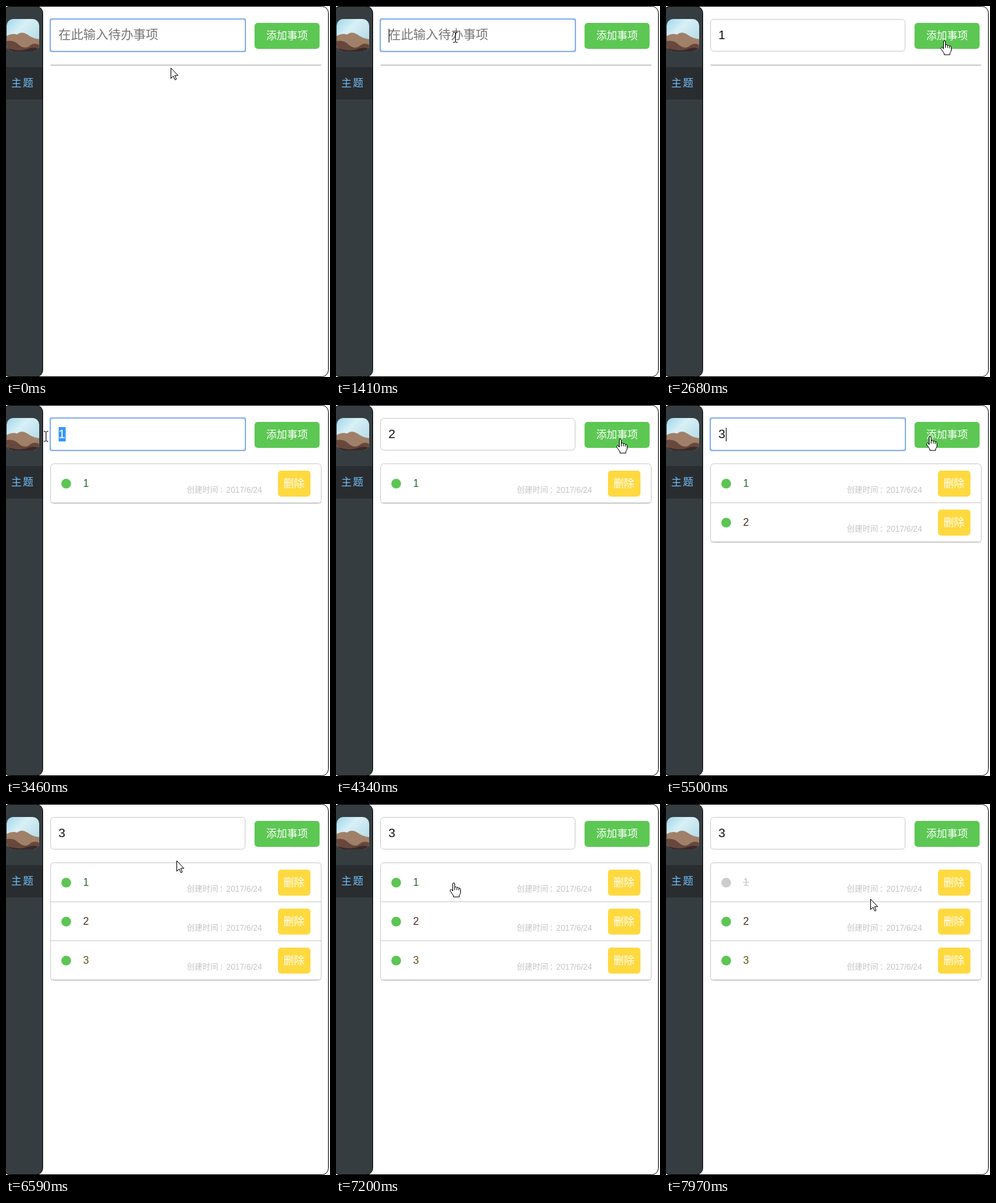
An HTML page for the animation above (8 s loop, 498 by 571 pixels).

```html
<!DOCTYPE html>
<html lang="zh-CN">
<head>
<meta charset="utf-8">
<title>待办事项</title>
<style>
  html, body { margin: 0; width: 100%; height: 100%; overflow: hidden; background: #fff; }
  svg { display: block; width: 498px; height: 571px; }
  text { font-family: "Liberation Sans", "Noto Sans CJK SC", "Noto Sans CJK", sans-serif; font-size: 16px; }
  .cjk { font-family: "Noto Sans CJK SC", "Noto Sans CJK", sans-serif; }
  .field { font-size: 19.2px; }
  .date { font-size: 12px; fill: #c4c4c4; }
  .mid { text-anchor: middle; fill: #fff; }
</style>
</head>
<body>
<svg viewBox="0 0 498 571">
  <defs>
    <linearGradient id="sky" x1="0" y1="0" x2="1" y2="1">
      <stop offset="0" stop-color="#9fd6ea"/>
      <stop offset=".35" stop-color="#d8f0f6"/>
      <stop offset="1" stop-color="#a9d3e2"/>
    </linearGradient>
    <clipPath id="round"><rect x="1" y="20" width="50" height="50" rx="10"/></clipPath>
  </defs>

  <rect x="-3.5" y=".5" width="499" height="570" rx="10" fill="#fff" stroke="#000"/>
  <rect x="-3.5" y=".5" width="60" height="570" rx="10" fill="#363d40" stroke="#000"/>
  <rect y="94" width="56" height="50" fill="#2a2d30"/>
  <text class="cjk" x="8" y="124" fill="#70bdf5" letter-spacing="2">主题</text>

  <g clip-path="url(#round)">
    <rect x="1" y="20" width="50" height="50" fill="url(#sky)"/>
    <path d="M1 46Q10 41 17 44Q24 38 33 44Q41 50 51 51V70H1Z" fill="#a08068"/>
    <path d="M1 54Q12 52 20 60Q30 68 38 60Q45 56 51 60V70H1Z" fill="#68483c"/>
    <path d="M1 65Q20 70 30 67Q42 62 51 66V70H1Z" fill="#3a2a2c"/>
  </g>

  <rect id="box" x="68.5" y="20.5" width="299" height="49" rx="5" fill="#fff" stroke="#ccc"/>
  <rect id="ring" x="68" y="20" width="300" height="50" rx="2" fill="none" stroke="#8ab2ec" stroke-width="2"/>
  <rect id="mark" x="81" y="34" width="10.7" height="22" fill="#3297fd"/>
  <text id="hint" class="cjk field" x="80.5" y="51" fill="#757575">在此输入待办事项</text>
  <text id="value" class="field" x="80.5" y="51"></text>
  <rect id="caret" y="35" width="1" height="21"/>

  <rect x="382" y="26" width="100" height="40" rx="5" fill="#5cc853"/>
  <text class="cjk mid" x="432" y="51">添加事项</text>

  <rect id="list" x="68.5" y="90.5" width="416" fill="#fff" stroke="#ccc"/>
  <g id="rows"></g>

  <g id="pointer" stroke="#000" stroke-width="1" fill="#fff">
    <path id="arrow" d="M.5 .5V16.5L4.2 13L6.8 18.7L9 17.7L6.5 12H11.5Z"/>
    <path id="hand" d="M-1.5 12V1Q-1.5 -.5 0 -.5Q1.5 -.5 1.5 1V6Q4 4.7 4.8 6.6Q7 5.5 7.8 7.6Q10.5 7 10.5 9.5V14Q10 17 8.5 18.5V21H-.5V19L-5 12.5Q-6.5 9.8 -4.5 9.3Q-3 9.2 -1.5 12ZM1.5 6V10.5M4.8 6.6V10.5M7.8 7.6V11"/>
    <path id="beam" fill="none" d="M-3 -7.5H-1L.5 -6.5L2 -7.5H4M.5 -6.5V7M-3 8H-1L.5 7L2 8H4"/>
  </g>
</svg>
<script>
const LOOP = 8000, STEP = 78.7, BLINK = 530;
const $ = id => document.getElementById(id);
const show = (el, on) => el.setAttribute("visibility", on ? "visible" : "hidden");
const set = (el, attrs) => { for (const k in attrs) el.setAttribute(k, attrs[k]); };

// time, x, y, easing of the way there
const ease = {
  line: p => p,
  out: p => 1 - (1 - p) ** 2,
  in: p => p * p,
  both: p => p * p * (3 - 2 * p)
};
const path = [
  [0, 253, 95, "line"], [472, 183, 48, "out"],
  [1730, 183, 48, "line"], [2520, 428, 54, "both"],
  [2830, 428, 54, "line"], [3300, 108, 47, "both"],
  [3540, 39, 48, "line"], [3700, 85, 49, "line"],
  [4250, 437, 53, "both"], [4420, 437, 53, "line"],
  [4580, 350, 54, "in"], [4740, 112, 57, "line"],
  [4960, 45, 68, "out"], [5420, 369, 50, "in"],
  [5505, 404, 49, "line"], [5740, 454, 50, "out"],
  [6280, 454, 50, "line"], [6600, 237, 92, "both"],
  [7130, 182, 122, "out"], [7200, 179, 122, "line"],
  [7440, 179, 122, "line"], [7960, 314, 146, "both"]
];

// latest entry whose time has come
const latest = (list, t) => list.filter(e => t >= e[0]).pop();

const typed = [[0, ""], [1800, "1"], [3780, "2"], [5340, "3"]];
const focus = [[0, true], [2670, false], [3300, true], [4330, false], [4740, true], [5960, false]];
const blinks = [340, 1800, 3300, 3780, 4740, 5340].map(t => [t]);
const drags = [[3300, 3780], [4740, 5340]];
const added = [2745, 4410, 6110], done = 7420;

const tints = ["#2f6b35", "#4a3022", "#62510f"];
$("rows").innerHTML = tints.map((tint, i) => `
  <g transform="translate(0 ${60 * i})">
    <path d="M69 150.5H484" stroke="#ccc"/>
    <circle cx="92.5" cy="121" r="7.5" fill="#5cc553"/>
    <text x="118.5" y="126" fill="${tint}">${i + 1}</text>
    <path d="M118 120.5H128" stroke="#c8c8c8" visibility="hidden"/>
    <text class="date cjk" x="278" y="135">创建时间<tspan dx="2">：</tspan></text>
    <text class="date" x="338.5" y="135" style="font-size:12.4px">2017/6/24</text>
    <rect x="418" y="101" width="50" height="40" rx="5" fill="#ffd940"/>
    <text class="cjk mid" x="442.5" y="126">删除</text>
  </g>`).join("");
const rows = [...$("rows").children];
const [, dot, label, strike] = rows[0].children;

function pointerAt(t) {
  const i = path.findIndex(p => p[0] > t);
  if (i < 0) return path[path.length - 1].slice(1, 3);
  const [t0, x0, y0] = path[i - 1], [t1, x1, y1, kind] = path[i];
  const p = ease[kind]((t - t0) / (t1 - t0));
  return [x0 + (x1 - x0) * p, y0 + (y1 - y0) * p].map(Math.round);
}

function shapeAt(x, y, dragging) {
  const inside = (l, t, r, b) => x >= l && x < r && y >= t && y < b;
  if (dragging || inside(68, 20, 370, 70)) return "beam";
  if (inside(382, 26, 482, 66) || inside(110, 101, 270, 141)) return "hand";
  return "arrow";
}

function draw(t) {
  const text = latest(typed, t)[1];
  const active = latest(focus, t)[1];
  const dragging = drags.some(([a, b]) => t >= a && t < b);
  const [x, y] = pointerAt(Math.floor((t + 10) / STEP) * STEP);
  const picked = drags.some(([a, b]) => t >= a + 100 && t < b);

  show($("ring"), active);
  show($("hint"), !text);
  show($("mark"), picked);
  $("value").textContent = text;
  set($("value"), { fill: picked ? "#fff" : "#111" });

  const blink = latest(blinks, t);
  show($("caret"), active && !picked && blink && Math.floor((t - blink[0]) / BLINK) % 2 === 0);
  set($("caret"), { x: text ? 92 : 81 });

  const count = added.filter(a => t >= a).length;
  set($("list"), { height: 1 + 60 * count, rx: count ? 5 : .5 });
  rows.forEach((row, i) => row.setAttribute("display", i < count ? "inline" : "none"));

  const off = t >= done;
  set(dot, { fill: off ? "#ccc" : "#5cc553" });
  set(label, { fill: off ? "#c8c8c8" : tints[0] });
  show(strike, off);

  const shape = shapeAt(x, y, dragging);
  for (const id of ["arrow", "hand", "beam"]) show($(id), id === shape);
  set($("pointer"), { transform: `translate(${x} ${y})` });
}

const start = performance.now();
function tick(now) {
  draw(Math.max(0, now - start) % LOOP);
  requestAnimationFrame(tick);
}
draw(0);
requestAnimationFrame(tick);
</script>
</body>
</html>
```
